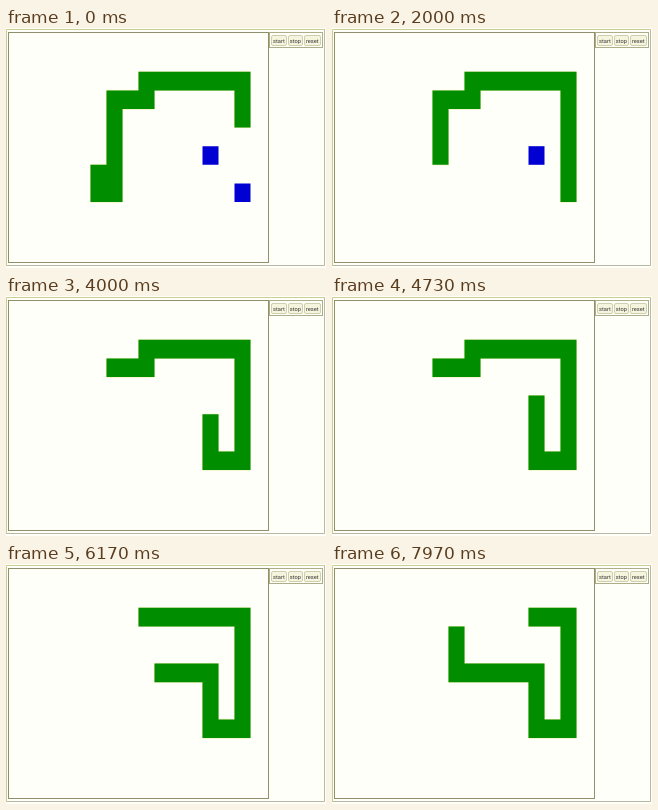
These frames come from a looping animation (320x240 px, 8 s). An HTML page:

```html
<!DOCTYPE html>
<html lang="en">
<head>
<meta charset="utf-8">
<title>Snake</title>
<style>
html, body { margin: 0; width: 100%; height: 100%; overflow: hidden; background: #fffffa; }
svg { display: block; width: 100%; height: 100%; }
text { font: 5.7px Roboto, "Liberation Sans", sans-serif; text-anchor: middle; fill: #333; }
.button { fill: #f5f5de; stroke: #c4c4a0; stroke-width: .8; }
#snake { fill: #008e00; stroke: #e9edaa; paint-order: stroke; }
#food { fill: #0000d2; }
</style>
</head>
<body>
<svg viewBox="0 0 320 240">
  <rect width="320" height="240" fill="#fffffa"/>
  <g fill="none">
    <path d="M.5 238V1.5H319" stroke="#cccc94"/>
    <path d="M1 237.5H318.5V2" stroke="#b8b8a4"/>
    <rect x="2.5" y="4.5" width="260" height="230" stroke="#90906c"/>
    <rect x="263.5" y="4.5" width="53" height="15" stroke="#adad88"/>
  </g>
  <rect class="button" x="265.5" y="7.5" width="15" height="10" rx="1.5"/>
  <rect class="button" x="282.5" y="7.5" width="14" height="10" rx="1.5"/>
  <rect class="button" x="298.5" y="7.5" width="16" height="10" rx="1.5"/>
  <text x="273" y="14.5">start</text>
  <text x="289.3" y="14.5">stop</text>
  <text x="306.3" y="14.5">reset</text>
  <path id="food"/>
  <path id="snake"/>
</svg>
<script>
const LOOP = 8000, STEP = 500, FIRST = 330;
const START_LENGTH = 19;
const LEFT = 4.5, TOP = 43.8, CELL_W = 16, CELL_H = 18.6;
const DIRS = { U: [0, -1], D: [0, 1], L: [-1, 0], R: [1, 0] };
const food = document.getElementById('food');
const snake = document.getElementById('snake');

// Whole route, tail first: the starting body, then the moves.
const route = [[5, 5]];
for (const d of 'DRUUUUURRURRRRRRDD' + 'DDDDLLUUULLLLLUU') {
  const [x, y] = route[route.length - 1];
  route.push([x + DIRS[d][0], y + DIRS[d][1]]);
}

// Each piece of food is eaten on the given move.
const foods = [{ cell: [14, 6], move: 4 }, { cell: [12, 4], move: 8 }];

const cellPath = ([col, row]) =>
  `M${LEFT + CELL_W * col} ${TOP + CELL_H * row}h${CELL_W}v${CELL_H}h${-CELL_W}z`;

const draw = cells => cells.map(cellPath).join('');

function movesAt(t) {
  if (t > 4270 && t < 4470) t = 4270; // brief stall
  return Math.max(0, Math.floor((t - FIRST) / STEP) + 1);
}

let shown = -1;
function render(now) {
  const n = movesAt(now % LOOP);
  if (n !== shown) {
    shown = n;
    // The tail waits for one move after each meal.
    const tail = n - foods.filter(f => n > f.move).length;
    snake.setAttribute('d', draw(route.slice(tail, START_LENGTH + n)));
    food.setAttribute('d', draw(foods.filter(f => n < f.move).map(f => f.cell)));
  }
}

const begin = performance.now();
function frame() {
  render(performance.now() - begin);
  requestAnimationFrame(frame);
}
frame();
</script>
</body>
</html>
```
